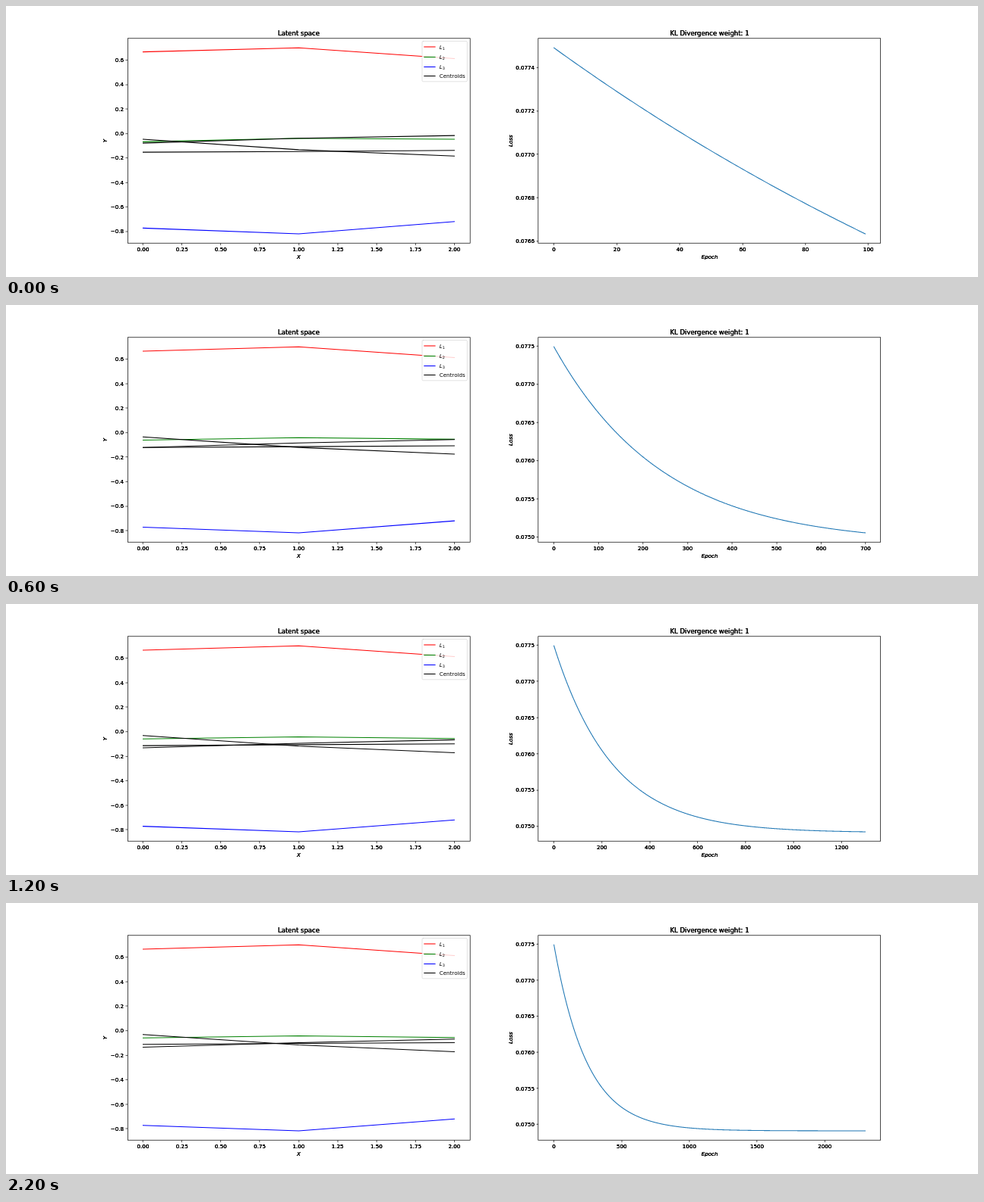
These frames come from a looping animation (1280x358 px, 2.3 s). An HTML page with a canvas:

```html
<!DOCTYPE html>
<html lang="en">
<head>
<meta charset="utf-8">
<title>Training curves</title>
<style>
  html, body { margin: 0; width: 100%; height: 100%; overflow: hidden; background: #fff; }
  canvas { display: block; width: 1280px; height: 358px; }
</style>
</head>
<body>
<canvas id="stage"></canvas>
<script>
const STEP_MS = 100, STEPS = 23;
const WIDTH = 1280, HEIGHT = 358;
const FIGURE = { w: 1800, h: 504 };   // layout units of the whole figure
const TOP = 60.48, BOTTOM = 441, AXES_W = 634.09, MARGIN = 1 / 22;
const FONT = '"DejaVu Sans", sans-serif';

const canvas = document.getElementById('stage');
const ctx = canvas.getContext('2d');
const ratio = window.devicePixelRatio || 1;
canvas.width = WIDTH * ratio;
canvas.height = HEIGHT * ratio;

// Each line: color, values at x = 0, 1, 2 at the first step, then after convergence.
const LINES = [
  ['#ff0000', [0.667, 0.700, 0.6125], [0.664, 0.700, 0.6125]],
  ['#008000', [-0.068, -0.040, -0.047], [-0.059, -0.042, -0.0565]],
  ['#0000ff', [-0.7735, -0.8205, -0.720], [-0.7715, -0.8165, -0.720]],
  ['#000000', [-0.047, -0.133, -0.185], [-0.031, -0.1165, -0.1715]],
  ['#000000', [-0.079, -0.040, -0.017], [-0.1345, -0.098, -0.069]],
  ['#000000', [-0.153, -0.148, -0.139], [-0.1115, -0.104, -0.0975]]
];

function loss(epoch) {
  const rate = 0.004057 + 0.000105 * (1 - Math.exp(-epoch / 400));
  return 0.074912 + 0.0025786 * Math.exp(-rate * epoch);
}

function niceStep(span) {
  const raw = span / 9;
  const power = 10 ** Math.floor(Math.log10(raw));
  return power * [1, 2, 2.5, 5, 10].find(s => s * power >= raw * 0.999999);
}

function ticks(min, max) {
  const pad = (max - min) * 0.05;
  const step = niceStep((max - min) + 2 * pad);
  let digits = 0;
  while (Math.abs(step * 10 ** digits - Math.round(step * 10 ** digits)) > 1e-6) digits++;
  const list = [];
  for (let i = Math.ceil((min - pad) / step); i * step <= max + pad; i++) {
    const value = i * step;
    list.push({ value, label: value.toFixed(digits).replace('-', '\u2212') });
  }
  return list;
}

function text(str, x, y, { size = 10, align = 'center', italic = false, turn = 0, passes = 3 } = {}) {
  ctx.save();
  ctx.translate(x, y);
  ctx.rotate(turn);
  ctx.font = `${italic ? 'italic ' : ''}${size}px ${FONT}`;
  ctx.textAlign = align;
  ctx.fillStyle = '#000';
  for (let i = 0; i < passes; i++) ctx.fillText(str, 0, 0);   // repeated passes darken the edges
  ctx.restore();
}

function polyline(points, color, width = 1.5, cap = 'square') {
  ctx.beginPath();
  points.forEach(([x, y]) => ctx.lineTo(x, y));
  ctx.strokeStyle = color;
  ctx.lineWidth = width;
  ctx.lineCap = cap;
  ctx.lineJoin = 'round';
  ctx.stroke();
}

function drawAxes(left, { title, xLabel, yLabel, xRange, yRange }, series) {
  const height = BOTTOM - TOP;
  const scale = (v, [min, max]) => MARGIN + (v - min) / (max - min) * (1 - 2 * MARGIN);
  const px = v => left + AXES_W * scale(v, xRange);
  const py = v => BOTTOM - height * scale(v, yRange);
  const snap = v => Math.floor(v) + 0.5;
  const middle = left + AXES_W / 2;

  for (const { value, label } of ticks(...xRange)) {
    const x = snap(px(value));
    polyline([[x, BOTTOM], [x, BOTTOM + 4]], '#000', 1, 'butt');
    text(label, px(value), 455.8);
  }
  let labelWidth = 0;
  ctx.font = `10px ${FONT}`;
  const yTicks = ticks(...yRange);
  for (const { label } of yTicks) labelWidth = Math.max(labelWidth, ctx.measureText(label).width);
  for (const { value, label } of yTicks) {
    const y = snap(py(value));
    polyline([[left - 3.5, y], [left, y]], '#000', 1, 'butt');
    text(label, left - 7, py(value) + 3.8, { align: 'right' });
  }

  for (const { color, points } of series) {
    polyline(points.map(([x, y]) => [px(x), py(y)]), color);
  }

  const edge = snap(left);
  ctx.strokeStyle = '#000';
  ctx.lineWidth = 1;
  ctx.lineJoin = 'miter';
  ctx.strokeRect(edge, 60.2, snap(left + AXES_W) - edge, 380.8);

  text(title, middle, TOP - 6, { size: 12 });
  text(xLabel, middle, 470.7, { italic: true });
  text(yLabel, left - 13.4 - labelWidth, (TOP + BOTTOM) / 2, { italic: true, turn: -Math.PI / 2 });
}

function drawLegend() {
  ctx.beginPath();
  ctx.roundRect(770.6, 65.5, 83.5, 75, 2);
  ctx.fillStyle = 'rgba(255,255,255,0.8)';
  ctx.fill();
  ctx.strokeStyle = 'rgba(204,204,204,0.8)';
  ctx.lineWidth = 1;
  ctx.stroke();
  [76, 95, 113.3, 130.2].forEach((y, i) => {
    polyline([[774.6, y], [794.6, y]], LINES[i][0]);
    if (i === 3) return text('Centroids', 802.6, y + 3.6, { align: 'left', passes: 1 });
    text('L', 802.6, y + 3.6, { align: 'left', italic: true, passes: 1 });
    text(String(i + 1), 808.3, y + 5.2, { size: 7, align: 'left', passes: 1 });
  });
}

function draw(step) {
  const epochs = 100 * (step + 1);
  const blend = Math.exp(-0.0024 * (epochs - 100));

  ctx.setTransform(ratio * WIDTH / FIGURE.w, 0, 0, ratio * HEIGHT / FIGURE.h, 0, 0);
  ctx.fillStyle = '#fff';
  ctx.fillRect(0, 0, FIGURE.w, FIGURE.h);

  const latent = LINES.map(([color, from, to]) => ({
    color,
    points: to.map((v, x) => [x, v + (from[x] - v) * blend])
  }));
  const values = latent.flatMap(line => line.points.map(p => p[1]));
  drawAxes(225, {
    title: 'Latent space', xLabel: 'X', yLabel: 'Y',
    xRange: [0, 2], yRange: [Math.min(...values), Math.max(...values)]
  }, latent);
  drawLegend();

  const points = Array.from({ length: epochs }, (_, e) => [e, loss(e)]);
  drawAxes(985.9, {
    title: 'KL Divergence weight: 1', xLabel: 'Epoch', yLabel: 'Loss',
    xRange: [0, epochs - 1], yRange: [loss(epochs - 1), loss(0)]
  }, [{ color: '#1f77b4', points }]);
}

const start = performance.now();
let shown = -1;
function tick() {
  const step = Math.floor((performance.now() - start) / STEP_MS) % STEPS;
  if (step !== shown) draw(shown = step);
  requestAnimationFrame(tick);
}
tick();
</script>
</body>
</html>
```
